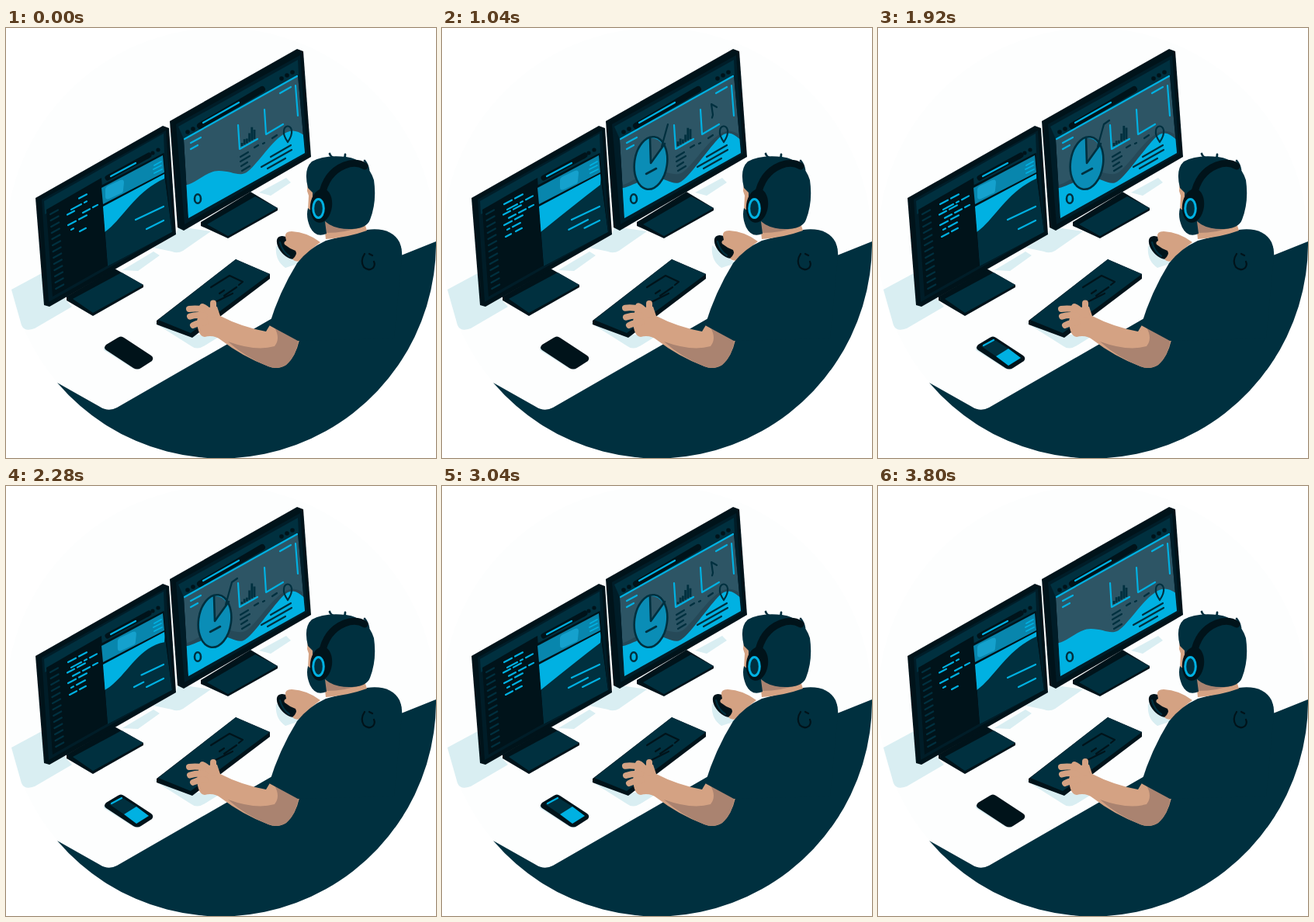
Write an HTML page that moves like this. It is 554 by 554 pixels and loops after 3.84 s.

```html
<!DOCTYPE html>
<html lang="en">
<head>
<meta charset="utf-8">
<title>Developer at a desk</title>
<style>
html, body { margin: 0; width: 100%; height: 100%; overflow: hidden; background: #fff; }
svg { display: block; width: 100vw; height: 100vh; }
.navy { fill: #00303f; }
.ink { fill: #00131a; }
.bezel { fill: #001d28; }
.cyan { fill: #00b1e2; }
.shade { fill: #d9eef2; }
.skin { fill: #d4a283; }
.dim { fill: #aa8370; }
.l { fill: none; stroke-width: 2.2; stroke-linecap: round; stroke-linejoin: round; }
.ln { stroke: #00303f; }
.li { stroke: #00131a; }
.lc { stroke: #00b1e2; }
.ls { stroke: #d4a283; stroke-width: 8; }
</style>
</head>
<body>
<svg viewBox="0 0 554 554">
  <defs>
    <clipPath id="screen"><path d="M229 144L376 61L385 161L235 245Z"/></clipPath>
    <clipPath id="card"><path d="M125 230L204 188L214 263L131 307Z"/></clipPath>
  </defs>
  <circle cx="277" cy="277" r="277" fill="#fdfefe"/>

  <!-- table shadows -->
  <path class="shade" d="M7 337L46 316L85 359L37 387Q24 392 20 383Z"/>
  <path class="shade" d="M150 312L190 288L198 293L170 313ZM190 283L219 266L222 256L264 262L228 287Q221 291 214 288ZM326 212L361 193L367 199L341 216ZM190 379L239 410Q247 416 258 408L287 390L240 396ZM126 411L126 415L164 439L174 440L160 430ZM348 280Q346 300 360 309L378 303Z"/>

  <!-- front of the desk -->
  <path class="navy" d="M66 457L121 488Q132 495 143 489L343 374L400 330L509 293L554 275A277 277 0 0 1 66 457Z"/>

  <!-- left monitor -->
  <path class="ink" d="M78 346L140 310L177 331V334L112 371L78 351Z"/>
  <path class="navy" d="M86 349L149 315L177 331L112 367Z"/>
  <path class="ink" d="M38 219L202 126L210 129L219 266L56 359L49 357Z"/>
  <path class="bezel" d="M46 221L206 132L215 262L55 353Z"/>
  <path class="navy" d="M49 223L203 136L204 161L50 240Z"/>
  <path class="ink" d="M52 234L123 193L131 306L60 346Z"/>
  <path class="l li" d="M131 193L184 164" style="stroke-width:7"/>
  <path class="l lc" d="M135 191L167 174"/>
  <g class="ink"><circle cx="182" cy="166" r="2.6"/><circle cx="189" cy="161" r="2.6"/><circle cx="196" cy="157" r="2.6"/></g>
  <path class="ink" d="M123 203L203 161L214 263L131 307Z"/>
  <path d="M123 206L202 164L204 186L125 227Z" fill="#0886ad"/>
  <path id="tile" d="M132 203L147 196Q152 194 152 199L151 209Q151 212 148 213L133 220Q128 222 128 217V208Q128 205 132 203Z" fill="#15a1cd"/>
  <path class="l lc" style="stroke-width:1.8" d="M190 182L200 177M191 187L201 182M191 177L200 172"/>
  <g clip-path="url(#card)">
    <path class="navy" d="M125 230L204 188L214 263L131 307Z"/>
    <path id="hill" class="cyan"/>
  </g>
  <g id="notes"></g>
  <g id="gutter"></g>
  <g id="code"></g>

  <!-- right monitor -->
  <path class="ink" d="M251 250L315 211L350 232V235L286 271L251 255Z"/>
  <path class="navy" d="M259 253L321 217L350 232L286 268Z"/>
  <path class="ink" d="M211 120L375 27L383 30L393 166L229 261L221 257Z"/>
  <path class="bezel" d="M219 124L379 35L388 162L230 253Z"/>
  <path class="navy" d="M222 127L376 41L377 60L229 143Z"/>
  <path class="l li" d="M250 126L330 79" style="stroke-width:8"/>
  <path class="l lc" d="M254 122L300 96"/>
  <g class="ink"><circle cx="234" cy="134" r="2.8"/><circle cx="241" cy="130" r="2.8"/><circle cx="355" cy="65" r="2.8"/><circle cx="362" cy="61" r="2.8"/><circle cx="369" cy="57" r="2.8"/></g>
  <g clip-path="url(#screen)">
    <path d="M229 144L376 61L385 161L235 245Z" fill="#2d5565"/>
    <path id="backwave" fill="#203f4d"/>
    <path id="wave" class="cyan"/>
  </g>
  <path class="l lc" d="M230 143L375 62M373 74L376 113M238 148L251 141M238 156L247 151M353 84L367 76M299 125L301 156L324 143M333 105L335 137L357 124"/>
  <path class="l ln" d="M302 166L312 160M302 172L314 165M303 178L311 173M304 184L314 178M320 154L325 151M331 149L333 148M343 142L349 138M329 179L368 157M341 166L367 151M337 181L360 168"/>
  <path class="l ln" d="M363 147Q357 138 358 133A5 6 0 0 1 368 132Q369 138 363 147Z"/>
  <ellipse class="l ln" cx="247" cy="220" rx="4" ry="5.8" style="stroke-width:2.6"/>
  <path id="bars" class="l ln" style="stroke-width:2.8;stroke-linecap:butt"/>
  <path id="graph" class="l ln" pathLength="1" d="M337 131L342 119L345 126L349 112L347 98L354 102"/>
  <g id="pie">
    <ellipse class="l ln" cx="269" cy="174" rx="21" ry="34" transform="rotate(8 269 174)" style="stroke-width:2.6;fill:#0a8db6"/>
    <path d="M269 174L268 142Q278 141 285 151Z" fill="#2d5565"/>
    <path class="l ln" style="stroke-width:2.6" d="M268 142L269 174L287 149M263 188L276 181"/>
  </g>
  <path id="pointer" class="l ln" pathLength="1" d="M283 153L291 124L298 119"/>

  <!-- keyboard and phone -->
  <path class="ink" d="M194 377L296 298L340 317V323L240 399L194 382Z"/>
  <path class="navy" d="M196 376L296 298L340 317L238 393Z"/>
  <path class="l li" d="M264 334L288 319L305 327L300 331M275 342L281 338M281 345L297 334M268 354L292 342"/>
  <path class="ink" d="M129 408L144 399Q148 396 152 399L187 422Q191 425 188 429L174 438Q169 441 164 438L129 415Q125 412 129 408Z"/>
  <g id="phone">
    <path class="navy" d="M133 410L149 401L168 413L152 423Z"/>
    <path class="cyan" d="M152 423L168 413L184 425L168 435Z"/>
    <path class="l lc" d="M136 409L149 402"/>
  </g>

  <!-- mouse and hand -->
  <g id="mouse">
    <ellipse class="ink" cx="363" cy="283" rx="18" ry="10" transform="rotate(48 363 283)"/>
    <path class="l ln" d="M353 276Q356 288 365 294"/>
    <path class="skin" d="M360 269Q359 262 368 262Q388 263 405 276Q391 286 382 299Q374 303 369 298Q376 292 373 287Q365 284 359 279Q357 276 361 274Z"/>
  </g>

  <!-- typing arm -->
  <path class="skin" d="M249 361L272 359L276 371Q303 385 335 391L341 381L378 402Q373 424 361 434Q350 441 338 436Q304 423 277 402Q268 395 256 398Q247 397 246 378Z"/>
  <path class="dim" d="M286 404Q322 417 346 410Q354 400 346 386L377 402Q373 424 361 434Q350 441 338 436Q308 424 286 404Z"/>
  <g id="fingers"></g>

  <!-- shirt, neck, head -->
  <path class="navy" d="M339 383Q352 340 375 303Q390 284 412 274L465 260Q496 256 507 276Q511 285 510 296L500 400L376 403Z"/>
  <path class="skin" d="M409 245L412 272Q440 270 465 261L460 245Z"/>
  <path class="dim" d="M412 264Q438 264 461 255L460 245L411 247Z"/>
  <path class="l li" d="M462 291Q456 300 461 308Q467 314 473 309Q476 305 474 301M468 291L472 293"/>
  <path class="skin" d="M389 198L388 210L390 216L389 235L405 255L415 200Z"/>
  <path class="navy" d="M389 206Q383 182 394 172Q410 163 438 166Q466 170 474 196Q478 224 469 247Q465 258 446 259Q423 260 411 249L413 265Q399 271 392 257Q386 244 389 232L395 237L395 212Z"/>
  <path class="l ln" style="stroke-width:2.8" d="M417 162Q418 166 424 168M432 171Q437 169 437 163M462 171Q466 176 467 183"/>
  <path class="l li" d="M407 216Q412 187 436 177Q451 171 462 178" style="stroke-width:9"/>
  <ellipse class="ink" cx="406" cy="229" rx="14" ry="22" transform="rotate(8 406 229)"/>
  <ellipse class="l lc" cx="402.5" cy="232.5" rx="6.8" ry="12" style="stroke-width:3;fill:#00303f"/>
</svg>
<script>
const LOOP = 3840, STEP = 40;
const $ = id => document.getElementById(id);
const mix = (a, b, k) => a + (b - a) * k;

function ramp(t, a, b) {
  const k = Math.min(1, Math.max(0, (t - a) / (b - a)));
  return k * k * (3 - 2 * k);
}
const pulse = (t, a, b, c, d) => ramp(t, a, b) - ramp(t, c, d);

function line(parent, cls, d) {
  const el = document.createElementNS('http://www.w3.org/2000/svg', 'path');
  el.setAttribute('class', 'l ' + cls);
  el.setAttribute('pathLength', 1);
  el.setAttribute('d', d);
  $(parent).append(el);
  return el;
}

function trim(el, from, to) {
  el.style.visibility = to - from > 0.01 ? 'visible' : 'hidden';
  el.style.strokeDasharray = `${to - from} 2`;
  el.style.strokeDashoffset = -from;
}

for (let i = 0; i < 13; i++) {
  const x = 57 + i * 0.6, y = 240 + i * 8;
  line('gutter', 'ln', `M${x} ${y}l10 -5.5`);
}

// Each row: height at x = 80, then start/end pairs along the slope.
const rows = [
  [227, 80, 90, 94, 104],
  [236, 84, 97, 101, 104, 108, 117],
  [240, 79, 88, 92, 102],
  [248, 86, 95, 99, 108, 112, 118],
  [254, 80, 90, 94, 104],
  [262, 84, 87, 91, 102],
  [270, 82, 91, 95, 103]
];
const code = rows.flatMap(([y, ...xs], r) => {
  const at = x => `${x} ${y - (x - 80) * 0.53}`;
  const out = [];
  for (let i = 0; i < xs.length; i += 2) {
    const el = line('code', 'lc', `M${at(xs[i])}L${at(xs[i + 1])}`);
    out.push({ el, show: 300 + r * 100 + i * 40, typed: (r * 2 + i) % 3 === 0 });
  }
  return out;
});

const notes = ['M167 247L203 230', 'M163 260L188 247', 'M181 259L203 248']
  .map(d => line('notes', 'lc', d));
const fingers = [[236, 362, 256, 363], [237, 373, 256, 371], [241, 383, 257, 379], [253, 359, 262, 366], [267, 356, 267, 370]]
  .map(p => ({ p, el: line('fingers', 'ls', '') }));

// Lower edge of the card's hill: two control points and the end point.
const hills = [
  [150, 247, 165, 212, 204, 194],
  [157, 249, 170, 205, 204, 206],
  [153, 242, 178, 222, 204, 202]
];
const waveHigh = [203, 184, 191, 187, 152, 141, 130, 140];
const waveLow = [207, 193, 204, 198, 163, 147, 133, 146];

function waveShape(k) {
  const [a, b, c, d, e, f, g, h] = waveHigh.map((y, i) => mix(y, waveLow[i], k));
  return `M229 ${a}C245 ${a - 2} 258 ${b} 274 ${b}S298 ${c} 308 ${d}S338 ${e} 352 ${f}S372 ${g} 387 ${h}V250H229Z`;
}

function draw(t) {
  const p = t % (LOOP / 2);
  const slide = 24 * pulse(p, 80, 540, 1340, 1860);
  $('tile').setAttribute('transform', `translate(${slide} ${-slide / 2})`);

  const toB = ramp(p, 100, 560), toC = ramp(p, 680, 1030), back = ramp(p, 1300, 1860);
  const [c1, c2, c3, c4, c5, c6] = hills[0].map((a, i) =>
    mix(mix(mix(a, hills[1][i], toB), hills[2][i], toC), a, back));
  $('hill').setAttribute('d', `M124 228L205 186L${c5} ${c6}C${c3} ${c4} ${c1} ${c2} 127 263Z`);

  notes.forEach((el, i) => {
    const d = i * 70;
    const from = 0.5 * pulse(p, 200 + d, 560 + d, 680 + d, 1000 + d);
    trim(el, from, i === 1 ? pulse(p, 120, 560, 1400, 1800) : 1);
  });

  code.forEach(({ el, show, typed }) => {
    trim(el, 0, typed ? pulse(t, show, show + 200, 3260, 3640) : 1);
  });

  const open = pulse(t, 80, 520, 3260, 3700);
  $('wave').setAttribute('d', waveShape(open));
  $('backwave').setAttribute('d', waveShape(0));
  $('backwave').setAttribute('opacity', 0.5 * open);
  $('pie').setAttribute('transform', `translate(269 174) scale(${open}) translate(-269 -174)`);
  $('pie').setAttribute('opacity', open);
  trim($('pointer'), 0, pulse(t, 680, 1200, 2500, 2960));
  trim($('graph'), ramp(p, 700, 1060) * 0.55 + ramp(p, 1180, 1500) * 0.45, ramp(p, 420, 960));

  let bars = '';
  for (let i = 0; i < 6; i++) {
    const x = 304 + i * 3.2, y = 152 - i * 1.8;
    const sway = 2.5 * Math.sin(2 * Math.PI * t / LOOP + i) * Math.sin(Math.PI * t / LOOP);
    bars += `M${x} ${y}v${-[4, 7, 6, 11, 17, 12][i] - sway}`;
  }
  $('bars').setAttribute('d', bars);

  $('phone').setAttribute('opacity', pulse(t, 1440, 1560, 3320, 3440));

  fingers.forEach(({ p: [x, y, u, v], el }, i) => {
    const lift = 1.5 * Math.max(0, Math.sin(2 * Math.PI * (t / 480 + i * 0.3)));
    el.setAttribute('d', `M${x} ${y - lift}Q${(x + u) / 2} ${(y + v) / 2 - lift - 2} ${u} ${v}`);
  });
  const nudge = pulse(t, 100, 560, 1100, 1900);
  $('mouse').setAttribute('transform', `translate(${nudge * 2} ${-nudge})`);
}

function tick() {
  draw(Math.floor((performance.now() % LOOP) / STEP) * STEP);
  requestAnimationFrame(tick);
}
tick();
</script>
</body>
</html>
```
